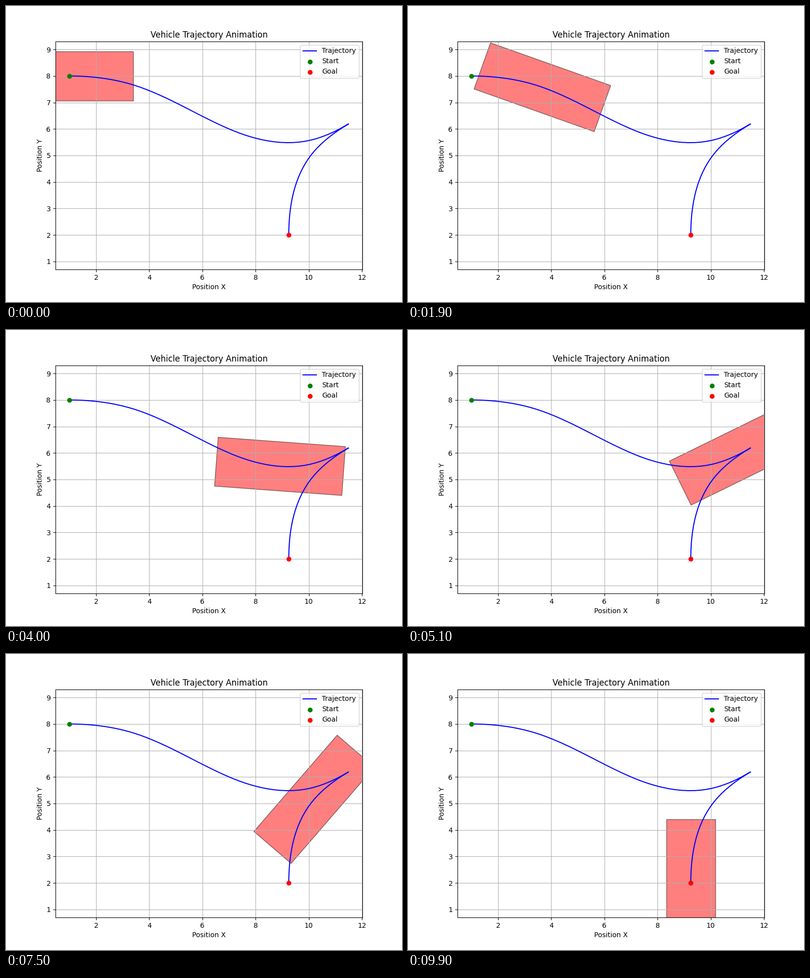
A matplotlib script for the animation above (10 s loop, 800 by 600 pixels).

```python
import numpy as np
import matplotlib.pyplot as plt
from matplotlib.animation import FuncAnimation
from matplotlib.patches import Polygon

LENGTH, WIDTH = 4.8, 1.85
INTERVAL = 100

# x, y, heading in degrees; the two legs meet where the vehicle starts reversing
START, TURN, GOAL = (1, 8, 0), (11.494, 6.19, 31), (9.25, 2, 90)
FORWARD = [START, (3.679, 7.571, -19.7), (7.126, 5.95, -22.5), (9.821, 5.529, 9), TURN]
REVERSE = [TURN, (9.994, 4.888, 55.2), GOAL]


def segment(a, b, gear):
    """Cubic curve between two poses as rows of x, y, heading."""
    p0, p1 = np.array(a[:2]), np.array(b[:2])
    h0, h1 = np.radians([a[2], b[2]])
    arc = np.hypot(*(p1 - p0)) * (1 + (h1 - h0)**2 / 24)
    m0, m1 = (gear * arc * np.array([np.cos(h), np.sin(h)]) for h in (h0, h1))
    u = np.linspace(0, 1, 60)[:, None]
    pos = ((2 * u**3 - 3 * u**2 + 1) * p0 + (u**3 - 2 * u**2 + u) * m0
           + (3 * u**2 - 2 * u**3) * p1 + (u**3 - u**2) * m1)
    slope = gear * (6 * (u**2 - u) * (p0 - p1) + (3 * u**2 - 4 * u + 1) * m0
                    + (3 * u**2 - 2 * u) * m1)
    return np.column_stack([pos, np.arctan2(slope[:, 1], slope[:, 0])])


def drive(keys, gear, steps):
    """Poses along a leg, easing from rest to rest."""
    curve = np.vstack([segment(a, b, gear) for a, b in zip(keys, keys[1:])])
    dist = np.r_[0, np.cumsum(np.hypot(*np.diff(curve[:, :2], axis=0).T))]
    t = np.linspace(0, 1, steps)
    s = dist[-1] * t**2 * (3 - 2 * t)
    return np.column_stack([np.interp(s, dist, col) for col in curve.T])


def corners(pose):
    x, y, heading = pose
    c, s = np.cos(heading), np.sin(heading)
    box = np.array([(-1, -1), (1, -1), (1, 1), (-1, 1)]) * (LENGTH / 2, WIDTH / 2)
    return box @ np.array([[c, s], [-s, c]]) + (x, y)


poses = np.vstack([drive(FORWARD, 1, 60), drive(REVERSE, -1, 40)])

fig, ax = plt.subplots(figsize=(8, 6), dpi=100)
ax.plot(poses[:, 0], poses[:, 1], color="blue", label="Trajectory")
ax.scatter(*START[:2], color="green", label="Start", zorder=3)
ax.scatter(*GOAL[:2], color="red", label="Goal", zorder=3)
vehicle = ax.add_artist(Polygon(corners(poses[0]), closed=True, facecolor="red",
                                edgecolor="black", alpha=0.5))

ax.axis("equal")
ax.set_title("Vehicle Trajectory Animation")
ax.set_xlabel("Position X")
ax.set_ylabel("Position Y")
ax.grid(True)
ax.legend(loc="upper right")


def update(step):
    vehicle.set_xy(corners(poses[step]))
    return vehicle,


anim = FuncAnimation(fig, update, frames=len(poses), interval=INTERVAL, repeat=True)
plt.show()
```
